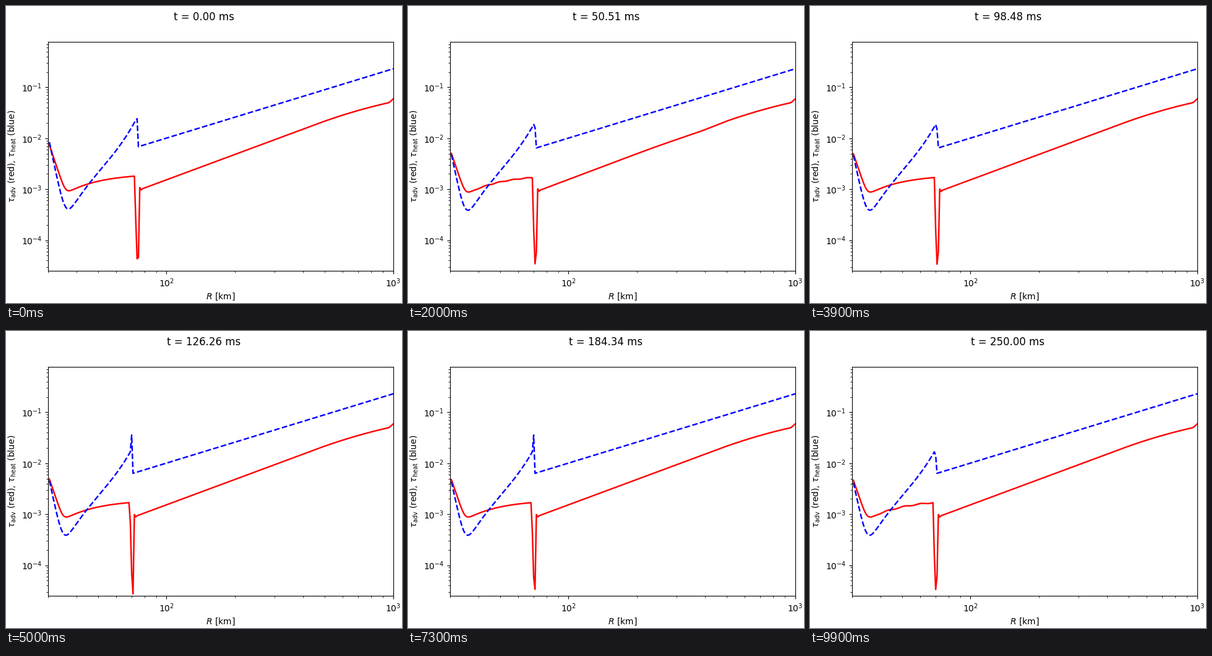
Write a matplotlib script that moves like this. It is 640 px wide and 480 px high and loops after 10000 ms.

```python
import numpy as np
import matplotlib.pyplot as plt
from matplotlib.animation import FuncAnimation

W, H, DPI = 640, 480, 100
FRAMES, T_END = 100, 250.0
LEFT, RIGHT, BOTTOM, TOP = 68.0, 625.6, 51.7, 422.4    # axes edges in pixels
STEP = 2.18                                            # log grid spacing in pixels

# Curves are shaped in pixel space (y down), then converted to data values
cell = np.arange(-62, 194)
X = 205.3 + STEP * cell


def radius(px):
    return 10 ** (3 + (px - RIGHT) / 366.15)


def tau(py):
    return 10 ** (-1 - (py - 131.4) / 82.1)


def soft_min(a, b, k):
    return -k * np.logaddexp(-a / k, -b / k)


def pulse(x, mid, width):
    return np.exp(-((x - mid) / width) ** 4)


def red_inner(x):
    return soft_min(237 + 2.95 * (x - 70), 272 + 20 * np.exp((120 - x) / 56), 10)


def blue_inner(x):
    d = x - 150
    return soft_min(238.5 + 4.7 * (x - 70), 265 - 1.19 * d - 7e-5 * d ** 3, 28)


# Infall above the shock: power laws, the red one bending near the outer edge
R = radius(X)
blue_outer = 101.5 + 0.3046 * (626 - X)
red_outer = (280.3 - 0.37 * (X - 259.6) + 0.00062 * np.maximum(X - 500, 0) ** 2
             - 0.65 * np.maximum(X - 619, 0))
fall_time = 38 * (1 - np.minimum(R / 1000, 1) ** 1.5)


def infall_wave(t):
    """Disturbance that enters at the outer edge and falls in."""
    launch = t - fall_time
    return 1.1 * pulse(launch, 15, 10) * np.cos(2 * np.pi * (launch - 9.4) / 13.1)


def ripple(t, mid, width, amp, length, crest):
    """Waves behind the shock, carried inward for a while."""
    wave = np.cos(2 * np.pi * (X - crest + 2.4 * (t - mid)) / length)
    return -amp * pulse(t, mid, width) * wave * np.clip((X - 100) / 20, 0, 1)


def profiles(t):
    relax = np.exp(-t / 5)
    late = np.clip((t - 28) / (T_END - 28), 0, 1)

    # The shock moves inward cell by cell; the phase shapes its dip in between
    travel = 0.65 + 3.3 * (1 - np.exp(-t / 6)) + 1.04 * late ** 3.3
    passed, phase = divmod(travel, 1)
    k = cell - (4 - int(passed))

    x = X - 3.7 * relax + 1.2 * late * np.exp((70 - X) / 40)
    waves = ripple(t, 68, 18, 1.4, 22.5, 128) + ripple(t, 250, 10, 0.8, 27, 125)
    red = np.where(k < 0, red_inner(x) - 2 * relax + waves, red_outer + infall_wave(t))
    blue = np.where(k < 0, blue_inner(x) - 2 * relax, blue_outer)

    red[k == -2] = 308 + 54 * phase
    red[k == -1] = 390 + 27 * phase
    red[k == 0] = 424.5 - 29 * phase
    red[k == 1] -= 3.5
    red[k == 2] += 1.2
    blue[k == -1] = 168 + 34 * np.clip((phase - 0.7) / 0.3, 0, 1) + 14 * relax
    return tau(red), tau(blue)


fig = plt.figure(figsize=(W / DPI, H / DPI), dpi=DPI)
ax = fig.add_axes([LEFT / W, BOTTOM / H, (RIGHT - LEFT) / W, (TOP - BOTTOM) / H])
red_line, = ax.loglog(R, np.ones_like(R), "r-", lw=1.75)
blue_line, = ax.loglog(R, np.ones_like(R), "b--", lw=1.75)
ax.set_xlim(30, 1000)
ax.set_ylim(2.49e-5, 0.787)
ax.set_xlabel(r"$R$ [km]")
ax.set_ylabel(r"$\tau_\mathrm{adv}$ (red), $\tau_\mathrm{heat}$ (blue)")
title = fig.suptitle("", y=0.982)


def update(i):
    t = T_END * i / (FRAMES - 1)
    red, blue = profiles(t)
    red_line.set_ydata(red)
    blue_line.set_ydata(blue)
    title.set_text(f"t = {t:.2f} ms")
    return red_line, blue_line, title


anim = FuncAnimation(fig, update, frames=FRAMES, interval=100, repeat=True,
                     repeat_delay=0, blit=False)
plt.show()
```
